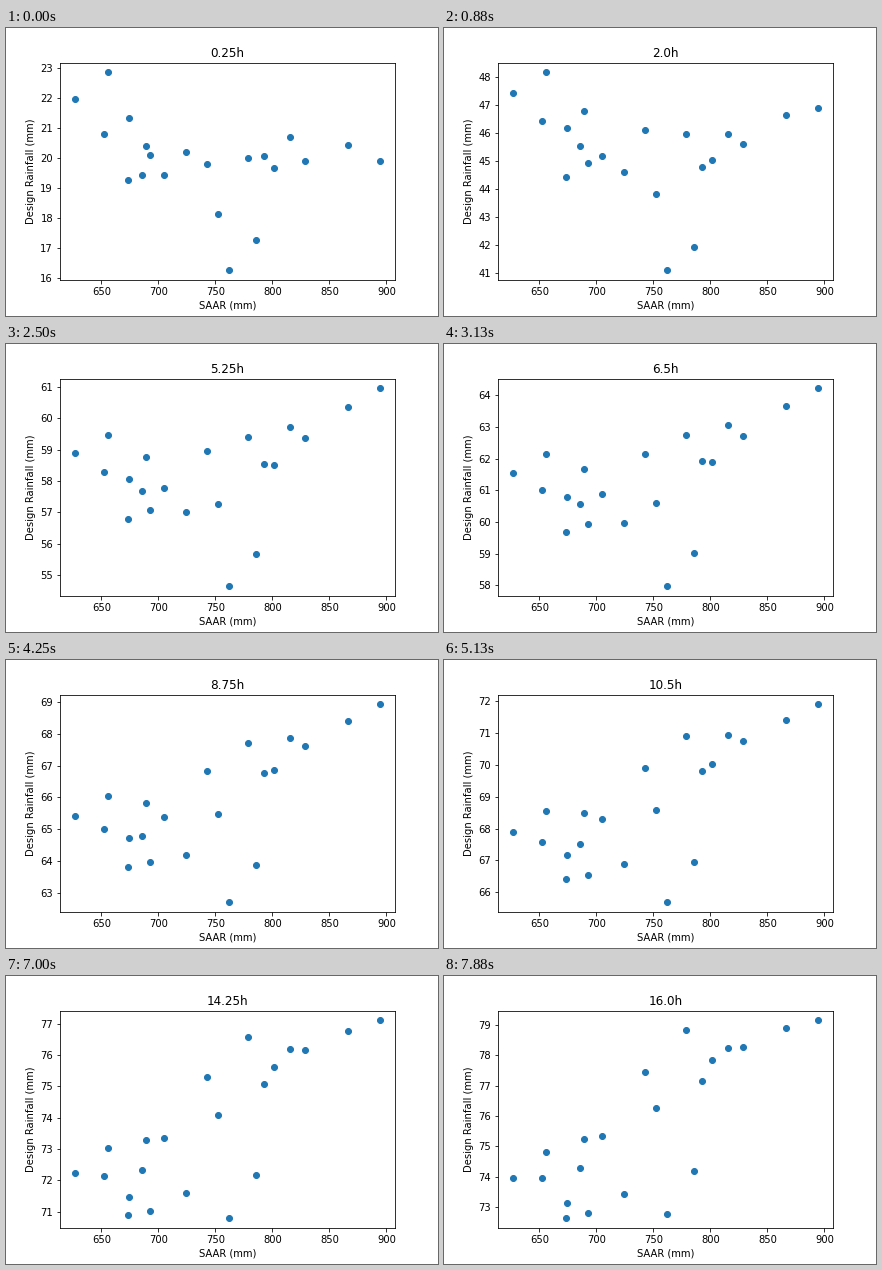
Recreate the animation shown at these times as a matplotlib script. Size 432x288 px, loop 8 s.

```python
import numpy as np
import matplotlib.pyplot as plt
from matplotlib.animation import FuncAnimation

STEP = 0.25   # hours added per frame
FRAMES = 64
LAG = 0.26    # hours; intensity falls roughly as a power of (t + LAG)

saar = [627, 652, 656, 673, 674, 686, 689, 693, 705, 724, 743,
        752, 762, 779, 786, 793, 801, 815, 829, 866, 894]

# Design rainfall (mm) per site at key storm durations (hours)
depths = {
    0.25: [21.95, 20.79, 22.85, 19.27, 21.33, 19.41, 20.39, 20.09, 19.41, 20.21, 19.79,
           18.12, 16.25, 19.99, 17.25, 20.06, 19.65, 20.69, 19.89, 20.42, 19.89],
    2.0: [47.41, 46.41, 48.16, 44.44, 46.18, 45.55, 46.80, 44.93, 45.18, 44.60, 46.10,
          43.82, 41.10, 45.96, 41.92, 44.78, 45.03, 45.96, 45.60, 46.64, 46.89],
    4.0: [55.59, 54.89, 56.13, 53.21, 54.63, 54.13, 55.21, 53.56, 54.03, 53.40, 55.11,
          53.21, 50.60, 55.32, 51.59, 54.41, 54.41, 55.59, 55.25, 56.25, 56.87],
    6.5: [61.55, 61.01, 62.15, 59.68, 60.80, 60.58, 61.67, 59.92, 60.88, 59.95, 62.15,
          60.60, 57.97, 62.75, 59.01, 61.93, 61.90, 63.07, 62.72, 63.67, 64.22],
    12.5: [70.33, 70.14, 71.06, 68.94, 69.60, 70.23, 71.18, 69.06, 71.15, 69.54, 72.93,
           71.69, 68.59, 74.10, 69.92, 72.80, 73.20, 73.91, 73.81, 74.42, 74.84],
    16.0: [73.95, 73.95, 74.81, 72.63, 73.13, 74.28, 75.24, 72.80, 75.34, 73.43, 77.45,
           76.26, 72.77, 78.84, 74.19, 77.15, 77.84, 78.24, 78.27, 78.90, 79.15],
}

hours = np.array(list(depths))
knots = np.log(hours + LAG)
log_rate = np.log(np.array(list(depths.values())) / hours[:, None])
slopes = np.gradient(log_rate, knots, axis=0, edge_order=2)


def rainfall(t):
    """Cubic Hermite interpolation of log intensity, returned as depth."""
    x = np.log(t + LAG)
    i = np.clip(np.searchsorted(knots, x) - 1, 0, len(knots) - 2)
    h = knots[i + 1] - knots[i]
    s = (x - knots[i]) / h
    rate = ((1 + 2 * s) * (1 - s) ** 2 * log_rate[i]
            + s * (1 - s) ** 2 * h * slopes[i]
            + s * s * (3 - 2 * s) * log_rate[i + 1]
            + s * s * (s - 1) * h * slopes[i + 1])
    return t * np.exp(rate)


fig, ax = plt.subplots(figsize=(6, 4), dpi=72)
fig.subplots_adjust(left=0.125, right=0.9, bottom=0.125, top=0.88)


def draw(frame):
    t = (frame + 1) * STEP
    ax.clear()
    ax.scatter(saar, rainfall(t))
    ax.set_title(f"{t}h")
    ax.set_xlabel("SAAR (mm)")
    ax.set_ylabel("Design Rainfall (mm)")


anim = FuncAnimation(fig, draw, frames=FRAMES, interval=125, repeat=True, repeat_delay=0)
plt.show()
```
